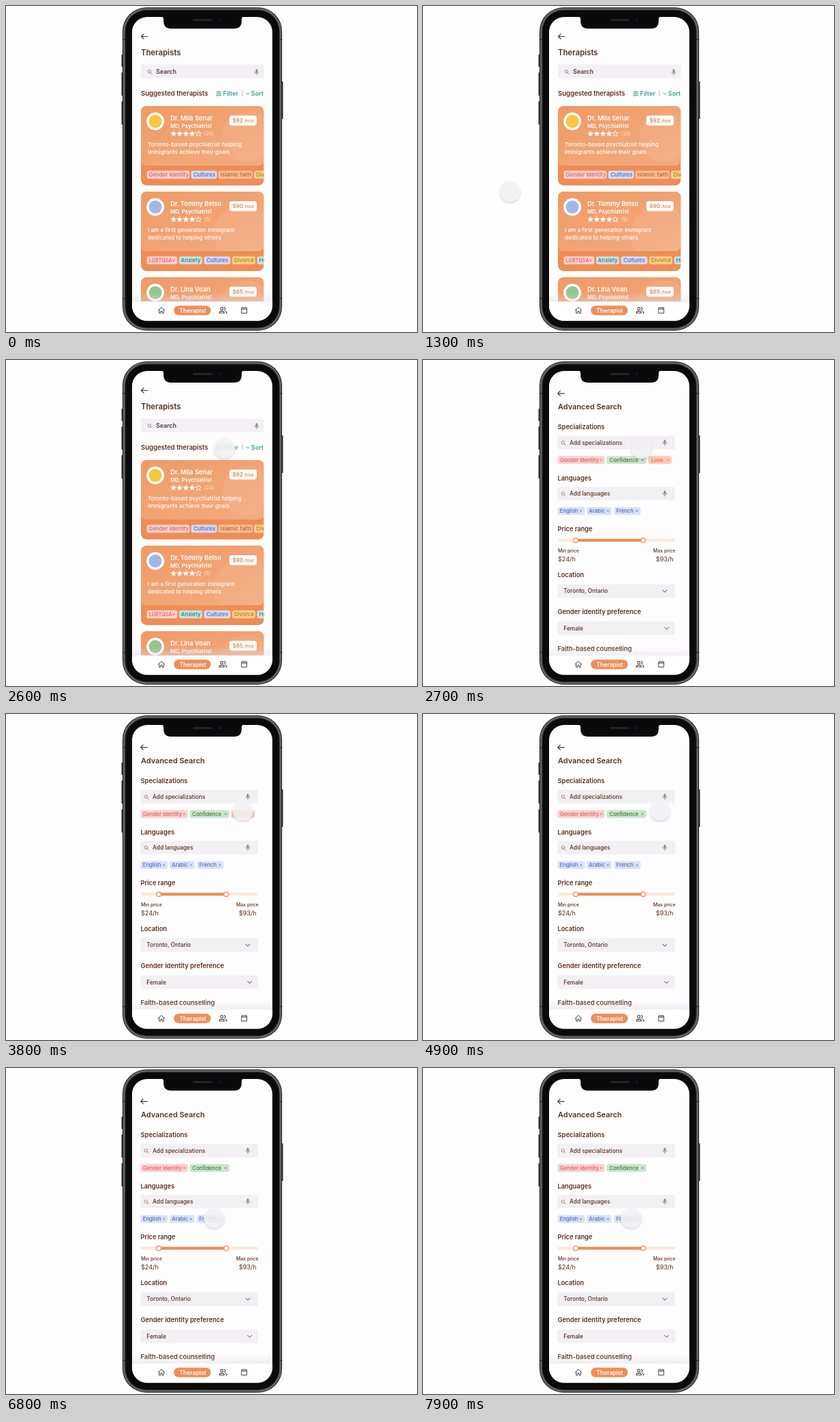
Animation, 600 px wide and 476 px high, one loop 8000 ms. Source, as an HTML page:

```html
<!DOCTYPE html>
<html lang="en">
<head>
<meta charset="utf-8">
<title>Therapist search</title>
<style>
html, body { margin: 0; width: 100%; height: 100%; overflow: hidden; background: #fefdff; }
svg { display: block; width: 600px; height: 476px; font-family: Inter, "Open Sans", sans-serif; }
</style>
</head>
<body>
<svg id="stage" viewBox="0 0 600 476" xmlns="http://www.w3.org/2000/svg"></svg>
<script>
const BROWN = '#57301f', ORANGE = '#ee8e57', TEAL = '#3c9f99', FIELD = '#f2f0f3', GREY = '#77727a';

// x, vertical centre, text
const text = (x, cy, s, size, fill = BROWN, weight = 600) =>
  `<text x="${x}" y="${(cy + size * 0.36).toFixed(2)}" font-size="${size}" font-weight="${weight}" fill="${fill}">${s}</text>`;
const rect = (x, y, w, h, r, fill, extra = '') =>
  `<rect x="${x}" y="${y}" width="${w}" height="${h}" rx="${r}" fill="${fill}" ${extra}/>`;
const circle = (x, y, r, fill, extra = '') =>
  `<circle cx="${x}" cy="${y}" r="${r}" fill="${fill}" ${extra}/>`;
const line = (d, stroke, width = 1, extra = '') =>
  `<path d="${d}" fill="none" stroke="${stroke}" stroke-width="${width}" stroke-linecap="round" stroke-linejoin="round" ${extra}/>`;

const arrow = (x, y) => line(`M${x + 10} ${y}H${x + .5}m3.6-3.6l-3.6 3.6l3.6 3.6`, BROWN, 1.2);
const chevron = (x, y, w, color) => line(`M${x - w} ${y - w / 2}l${w} ${w}l${w}-${w}`, color, .9);
const lens = (x, y) => circle(x - .6, y - .6, 2.2, 'none', `stroke="${GREY}" stroke-width=".8"`) +
  line(`M${x + 1.2} ${y + 1.2}l1.8 1.8`, GREY, .8);
const mic = (x, y) => rect(x - 1.4, y - 4.2, 2.8, 5.4, 1.4, '#8b868d') +
  line(`M${x - 2.9} ${y - .6}a2.9 2.9 0 0 0 5.8 0M${x} ${y + 2.4}v1.8`, '#8b868d', .8);

function star(cx, cy, r, full) {
  let pts = '';
  for (let i = 0; i < 10; i++) {
    const a = -Math.PI / 2 + i * Math.PI / 5, q = i % 2 ? r * .42 : r;
    pts += `${(cx + q * Math.cos(a)).toFixed(2)},${(cy + q * Math.sin(a)).toFixed(2)} `;
  }
  return `<polygon points="${pts}" fill="${full ? '#fff' : 'none'}" stroke="#fff" stroke-width="${full ? .2 : .8}"/>`;
}

const HUES = {
  red: ['#fbd0d0', '#d95f5d'], blue: ['#d3daf3', '#5568b4'], peach: ['#f9bd98', '#c55c30'],
  gold: ['#fbd08a', '#b9701c'], mint: ['#c6e2df', '#3d7a74'], green: ['#cde4ce', '#3b7843'],
  coral: ['#fccab2', '#e96c40'], sky: ['#d9e1fa', '#536bbb']
};

function tag([x, w, pad, s, hue], cy, size) {
  const [bg, fg] = HUES[hue];
  return rect(x, cy - 5.8, w, 11.6, 3, bg) + text(x + pad, cy, s, size, fg, 500);
}

function chip(x, w, pad, s, hue, cy) {
  const cx = x + w - 5.4;
  return tag([x, w, pad, s, hue], cy, 7.7) +
    line(`M${cx - 1.2} ${cy - 1.2}l2.4 2.4m0-2.4l-2.4 2.4`, HUES[hue][1], .7);
}

function card(y, c) {
  let s = rect(197, 0, 179.5, 116, 8, '#ee8d55') +
    `<g clip-path="url(#topClip)">` + rect(197, 0, 179.5, 87, 0, 'url(#cardTop)') +
    circle(...c.blob, '#fff', 'opacity=".07"') + '</g>' +
    circle(218, 22.5, 12.9, '#fff') + circle(218, 22.5, 9.4, c.color);
  for (const r of [7, 4]) {
    s += circle(218, 22.5, r, 'none', 'stroke="#fff" stroke-opacity=".25" stroke-width=".8" stroke-dasharray="1 1.2"');
  }
  s += text(240, 18, c.name, 9.2, '#fff') + text(240, 29.6, 'MD, Psychiatrist', 7.7, '#fff') +
    rect(326, 14, 40, 14.5, 4, '#fff') + text(330.5, 21.3, c.price, 8.2, '#e2783d', 500) +
    text(347.8, 21.6, '/hour', 5.6, '#e2783d', 500);
  for (let i = 0; i < 5; i++) s += star(244.5 + i * 9.1, 40.6, 4.5, i < 4);
  s += text(289, 40.4, c.votes, 7.4, '#fde3d3', 400);
  c.about.forEach((t, i) => s += text(207, 56.3 + i * 10.7, t, 8.2, '#fff', 500));
  c.tags.forEach(t => s += tag(t, 100.4, t[3] === 'LGBTQSA+' ? 7.3 : 7.9));
  return `<g transform="translate(0 ${y})" clip-path="url(#cardClip)">${s}</g>`;
}

const cards = [
  { name: 'Dr. Mila Senar', price: '$92', votes: '(24)', color: '#f8c43c', blob: [352, 45, 36],
    about: ['Toronto-based psychiatrist helping', 'immigrants achieve their goals'],
    tags: [[205.5, 62.5, 3, 'Gender Identity', 'red'], [270.3, 37.7, 3.5, 'Cultures', 'blue'],
      [310, 49.8, 3, 'Islamic faith', 'peach'], [362, 40, 3.2, 'Divorce', 'gold']] },
  { name: 'Dr. Tommy Belso', price: '$90', votes: '(5)', color: '#a3b5e4', blob: [345, 62, 42],
    about: ['I am a first generation immigrant', 'dedicated to helping others'],
    tags: [[205.5, 44.5, 3.2, 'LGBTQSA+', 'red'], [252.7, 33.7, 2.6, 'Anxiety', 'mint'],
      [289, 38.6, 3.4, 'Cultures', 'blue'], [330.3, 33.7, 2.8, 'Divorce', 'gold'],
      [366.5, 30, 3, 'Health', 'mint']] },
  { name: 'Dr. Lina Voan', price: '$85', votes: '(8)', color: '#93c48b', blob: [350, 45, 40], about: [], tags: [] }
];

const listPage = () => arrow(197, 44.5) + text(197, 68.3, 'Therapists', 11.3) +
  rect(197, 85.5, 179.5, 20, 2.5, FIELD) + lens(210, 96.3) + text(219, 95.8, 'Search', 8.8, '#55383a') + mic(366, 96.5) +
  text(197, 128, 'Suggested therapists', 9.5) +
  line('M307 125.4h2m2 0h3M307 128h4m2 0h1M307 130.6h1m2 0h4', TEAL) +
  line('M310 124.2v2.4M312 126.8v2.4M309 129.4v2.4', TEAL) +
  text(316.8, 128, 'Filter', 9.1, TEAL) + line('M345 123.5v8', '#a9a5ab', .8) +
  chevron(353, 128, 2.2, TEAL) + text(357.8, 128, 'Sort', 9, TEAL) +
  cards.map((c, i) => card(146 + i * 125, c)).join('');

const field = cy => rect(196.5, cy - 9.8, 171.5, 19.6, 2.5, FIELD);
const input = (cy, s) => field(cy) + lens(205, cy + .6) + text(214, cy, s, 8.25, BROWN, 500) + mic(353, cy);
const select = (cy, s, x) => field(cy) + text(205.3, cy, s, 8.3, BROWN, 500) + chevron(x, cy + .2, 3, BROWN);
const knob = x => circle(x, 263.2, 3.4, '#fff', `stroke="${ORANGE}" stroke-width="1.3"`);

const filterPage = () => arrow(196.2, 48.8) + text(197, 68, 'Advanced Search', 10.9) +
  text(196.5, 98, 'Specializations', 9.4) + input(120.6, 'Add specializations') +
  chip(196.5, 69, 3.3, 'Gender Identity', 'red', 146) + chip(268, 58, 4, 'Confidence', 'green', 146) +
  `<g id="love">${chip(328.7, 34.3, 4.5, 'Love', 'coral', 146)}</g>` +
  text(196.5, 172.3, 'Languages', 9.3) + input(195, 'Add languages') +
  chip(196.5, 39.5, 3.3, 'English', 'sky', 220.5) + chip(239, 36.3, 3, 'Arabic', 'sky', 220.5) +
  chip(279, 38.7, 3, 'French', 'sky', 220.5) +
  text(196.5, 246.7, 'Price range', 9.2) +
  rect(197, 261.1, 171, 4.2, 2.1, '#fbe9da') + rect(223, 261.1, 98.5, 4.2, 0, ORANGE) + knob(223) + knob(321.5) +
  text(197, 278.8, 'Min price', 6.9, BROWN, 500) + text(336, 278.8, 'Max price', 6.9, BROWN, 500) +
  text(197, 291, '$24/h', 9.1, BROWN, 400) + text(340, 291, '$93/h', 9.1, BROWN, 400) +
  text(196.5, 313.6, 'Location', 9.2) + select(337.4, 'Toronto, Ontario', 353) +
  text(196.5, 367.6, 'Gender identity preference', 9.35) + select(391.6, 'Female', 355.7) +
  text(196.5, 421.6, 'Faith-based counselling', 9.3);

const INK = '#4a4548';
const nav = () => rect(184, 418, 206, 14, 0, 'url(#navFade)') + rect(184, 431.5, 206, 30, 0, '#fff') +
  line('M222.3 444.2l4.6-4.2l4.6 4.2M223.6 443.4v5.2h2.2v-3h2.2v3h2.2v-5.2', INK) +
  rect(245, 437.4, 54, 14.2, 7.1, ORANGE) + text(253.3, 444.6, 'Therapist', 8.4, '#fff') +
  circle(315, 442, 1.9, 'none', `stroke="${INK}" stroke-width="1.1"`) +
  line('M311.3 448.3c0-3.6 7.4-3.6 7.4 0z', INK, 1.1) +
  line('M318.4 440.1a1.9 1.9 0 0 1 0 3.8M320.2 445.6c1.5.5 2.2 1.4 2.2 2.7h-1.4', INK, 1.1) +
  line('M344.2 440.8h7.4v7.6h-7.4zM344.2 442.6h7.4M345.9 439.6v1M349.9 439.6v1', INK);

const button = (x, y, h) => rect(x, y, 2, h, .8, '#2c2c2e');
const shell = (inset, fill) =>
  rect(170 + inset, 2 + inset, 233 - 2 * inset, 472 - 2 * inset, 35 - inset, fill);
const phone = () => button(168.6, 71, 18) + button(168.6, 97, 34) + button(168.6, 139, 34) + button(402.4, 110, 55) +
  shell(0, '#2b2b2d') + shell(1.3, '#737376') + shell(2.7, '#4a4a4c') + shell(4.3, '#0a0a0b') +
  line('M170.5 49h3M170.5 427h3M399.5 49h3M399.5 427h3', '#2b2b2d', 1.6);
const notch = () => `<path d="M226 15.5q4 0 4 4v2q0 11.5 11 11.5h92q11 0 11-11.5v-2q0-4 4-4z" fill="#0a0a0b"/>` +
  rect(273, 19, 28, 3, 1.5, '#242428') + circle(312, 20.5, 2, '#17192c');

document.getElementById('stage').innerHTML = `<defs>
  <clipPath id="screen"><rect x="184" y="16" width="204.8" height="443.6" rx="22"/></clipPath>
  <clipPath id="cardClip"><rect x="197" y="0" width="179.5" height="116" rx="8"/></clipPath>
  <clipPath id="topClip"><rect x="197" y="0" width="179.5" height="87" rx="8"/></clipPath>
  <linearGradient id="cardTop" x1="0" y1="0" x2="1" y2="1">
    <stop offset="0" stop-color="#ef9a67"/><stop offset="1" stop-color="#f3ab80"/></linearGradient>
  <linearGradient id="navFade" x1="0" y1="0" x2="0" y2="1">
    <stop offset="0" stop-color="#ddd9de" stop-opacity="0"/><stop offset="1" stop-color="#ddd9de" stop-opacity=".45"/></linearGradient>
  <filter id="soft" x="-50%" y="-50%" width="200%" height="200%"><feGaussianBlur stdDeviation="1.6"/></filter>
  </defs>
  <rect width="600" height="476" fill="#fefdff"/>${phone()}
  <g clip-path="url(#screen)">${rect(184, 15, 206, 446, 0, '#fefdfe')}
    <g id="list">${listPage()}</g><g id="filters">${filterPage()}</g>${nav()}</g>${notch()}
  <g id="cursor">${circle(0, 1.8, 15, '#77727a', 'opacity=".26" filter="url(#soft)"')}${circle(0, 0, 15, '#f6f5f7', 'opacity=".86"')}</g>`;

const LOOP = 8000, OPEN = 2700, REMOVE = 4200;
// time, x, y
const path = [
  [900, -25, 384], [1000, -12, 374], [1100, 17, 352], [1200, 70, 313], [1300, 127, 271],
  [1400, 186, 227], [1500, 240, 187], [1600, 280, 158], [1700, 303, 141], [1800, 315, 132],
  [1900, 319, 129], [2900, 319, 129], [3100, 325, 132], [3300, 340, 138], [3500, 346, 141],
  [5500, 346, 141], [5700, 340, 160], [5900, 328, 194], [6100, 312, 212], [6300, 304, 219], [8000, 304, 219]
];

function place(t) {
  const i = path.findIndex(p => p[0] > t);
  if (i < 1) return path[0].slice(1);
  const [t0, x0, y0] = path[i - 1], [t1, x1, y1] = path[i], k = (t - t0) / (t1 - t0);
  return [x0 + (x1 - x0) * k, y0 + (y1 - y0) * k];
}

const el = id => document.getElementById(id);
const list = el('list'), filters = el('filters'), love = el('love'), cursor = el('cursor');
const show = (node, on) => node.setAttribute('display', on ? 'inline' : 'none');

function draw(now) {
  const t = Math.floor((now % LOOP) / 100) * 100;
  show(list, t < OPEN);
  show(filters, t >= OPEN);
  show(love, t < REMOVE);
  show(cursor, t >= 1000);
  cursor.setAttribute('transform', `translate(${place(t).join(' ')})`);
}

const start = performance.now();
function tick() {
  draw(performance.now() - start);
  requestAnimationFrame(tick);
}
tick();
</script>
</body>
</html>
```
